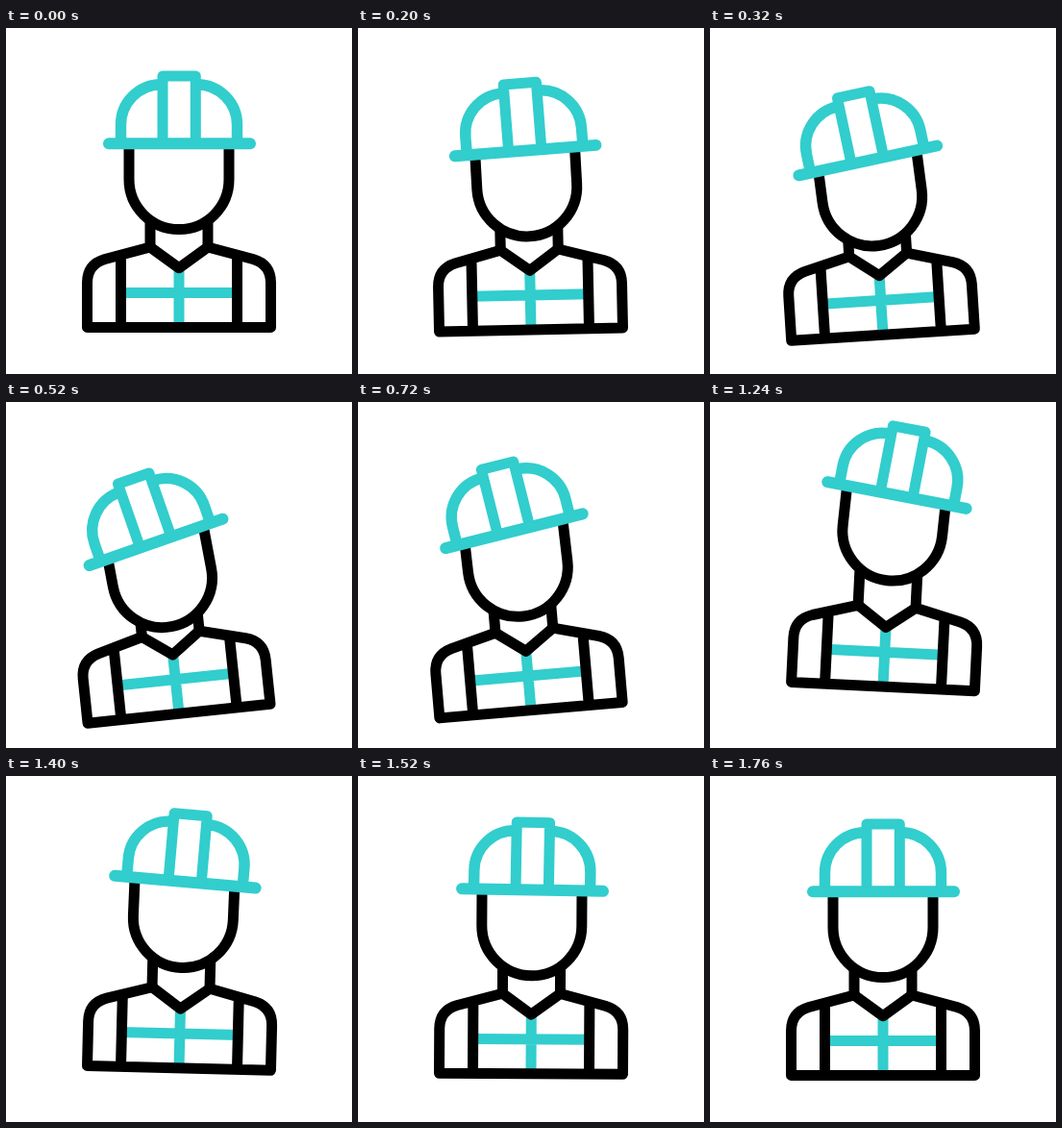
Write an HTML page with a canvas that moves like this. It is 360 by 360 pixels and loops after 1800 ms.

```html
<!DOCTYPE html>
<html lang="en">
<head>
<meta charset="utf-8">
<title>Construction worker</title>
<style>
  html, body { margin: 0; width: 100%; height: 100%; overflow: hidden; background: #fff; }
  canvas { display: block; width: 100vmin; height: 100vmin; }
</style>
</head>
<body>
<canvas id="stage"></canvas>
<script>
const SIZE = 360, LOOP = 1800, STEP = 40;
const BEAT = 550, MOVE = 440;   // time between moves, length of one move
const TEAL = '#32cdcd', BLACK = '#000', WHITE = '#fff';

const canvas = document.getElementById('stage');
const ctx = canvas.getContext('2d');

const shapes = {
  cross: new Path2D('M119 275.5H241M180 250V311'),
  torso: new Path2D('M84.5 311.4V265C84.5 252 91 244 103 240.5L150 228L180 249.7' +
    'L210 228L257 240.5C269 244 275.5 252 275.5 265V311.4ZM119.5 238V311M240.5 238V311'),
  neck: new Path2D('M150 228V193M210 228V193'),
  face: new Path2D('M128 114V157.5A52 52 0 0 0 232 157.5V114'),
  dome: new Path2D('M119.5 120V101A42 42 0 0 1 162 58.5H198A42 42 0 0 1 240.5 101V120'),
  sides: new Path2D('M119.5 120V101A42 42 0 0 1 161 58.7M240.5 120V101A42 42 0 0 0 199 58.7'),
  crest: new Path2D('M163 120V50H197.3V120'),
  brim: new Path2D('M107 120.2H254')
};

// Every part swings rest -> low -> high -> rest, relative to the part that carries it.
const body = {
  pivot: [180, 311], delay: 70,
  low: { angle: -6, y: 12.9 }, high: { angle: 3, y: -16.3 },
  paint() {
    line(shapes.cross, TEAL);
    line(shapes.torso, BLACK);
    line(shapes.neck, BLACK);
  }
};
const head = {
  pivot: [180, 190], delay: 0,
  low: { angle: -4.7, y: 11 }, high: { angle: 4.4, y: -11 },
  paint() {
    fill(shapes.face);
    line(shapes.face, BLACK);
  }
};
const helmet = {
  pivot: [180.5, 120], delay: 90,
  low: { angle: -8.5, y: 0 }, high: { angle: 4.8, y: 0 },
  paint() {
    fill(shapes.dome);
    line(shapes.sides, TEAL, 11.4);
    line(shapes.crest, TEAL);
    line(shapes.brim, TEAL, 12, 'round');
  }
};

// Sine ease from 0 to 1 over one move.
function progress(t, start) {
  const u = Math.min(1, Math.max(0, (t - start) / MOVE));
  return (1 - Math.cos(Math.PI * u)) / 2;
}

function swing({ low, high, delay }, key, t) {
  const [down, up, back] = [0, 1, 2].map(n => progress(t, delay + n * BEAT));
  return low[key] * (down - up) + high[key] * (up - back);
}

function place(part, t) {
  const [px, py] = part.pivot;
  ctx.translate(px, py + swing(part, 'y', t));
  ctx.rotate(swing(part, 'angle', t) * Math.PI / 180);
  ctx.translate(-px, -py);
}

function line(path, color, width = 11, cap = 'butt') {
  ctx.strokeStyle = color;
  ctx.lineWidth = width;
  ctx.lineCap = cap;
  ctx.stroke(path);
}

function fill(path) {
  ctx.fillStyle = WHITE;
  ctx.fill(path);
}

function draw(t) {
  const scale = canvas.width / SIZE;
  ctx.setTransform(scale, 0, 0, scale, 0, 0);
  ctx.fillStyle = WHITE;
  ctx.fillRect(0, 0, SIZE, SIZE);
  ctx.lineJoin = 'round';

  // Transforms add up: the body carries the head, the head carries the helmet.
  for (const part of [body, head, helmet]) {
    place(part, t);
    part.paint();
  }
}

function resize() {
  const side = Math.min(innerWidth, innerHeight) || SIZE;
  canvas.width = canvas.height = Math.round(side * (window.devicePixelRatio || 1));
}

const start = performance.now();
function tick() {
  const t = (performance.now() - start) % LOOP;
  draw(Math.floor(t / STEP) * STEP);
  requestAnimationFrame(tick);
}

addEventListener('resize', resize);
resize();
tick();
</script>
</body>
</html>
```
